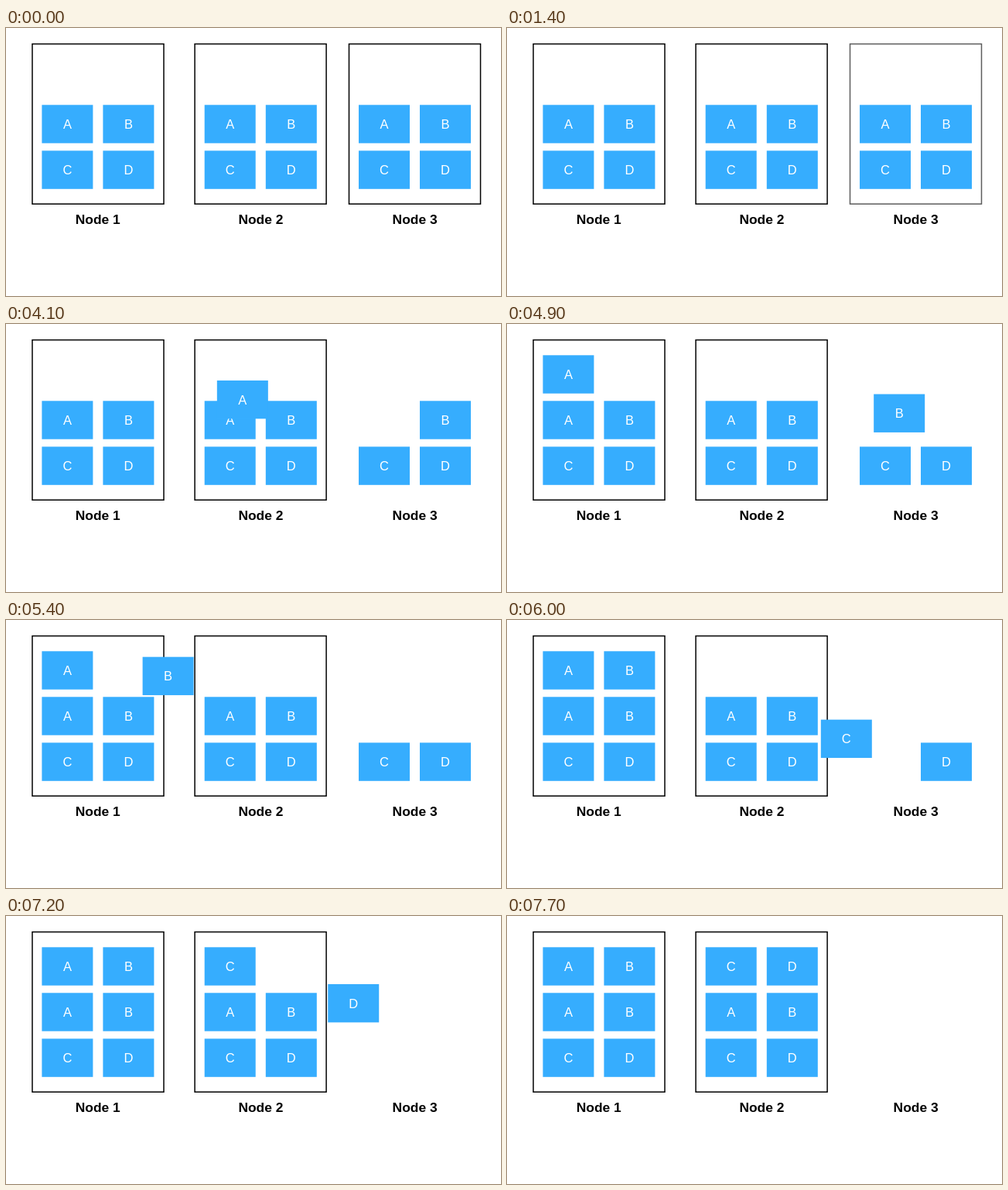
These frames come from a looping animation (640 by 346 pixels, 8 s). An HTML page:

```html
<!DOCTYPE html>
<html lang="en">
<head>
<meta charset="utf-8">
<title>Moving shards off a node</title>
<style>
  html, body { margin: 0; width: 100%; height: 100%; overflow: hidden; background: #fff; }
  svg { display: block; width: 100vw; height: 100vh; }
  text { font-family: "Liberation Sans", Arial, sans-serif; text-anchor: middle; }
  .frame { fill: none; stroke: #000; stroke-width: 1.5; }
  .name { font-size: 17.4px; font-weight: bold; fill: #000; }
  .tile rect { fill: #36adfe; }
  .tile text { font-size: 16.5px; fill: #fff; }
</style>
</head>
<body>
<svg id="stage" viewBox="0 0 640 346"></svg>
<script>
const LOOP = 8000;
const MOVE_TIME = 965;
const FADE = { start: 950, end: 2200 };
const TILE = { w: 66, h: 49.4 };
const ROWS = [40.3, 99.3, 158.4];
const NODES = [
  { x: 34, name: 118.7, cols: [46.4, 125.4] },
  { x: 244.1, name: 329.4, cols: [256.7, 335.8] },
  { x: 443.5, name: 528.6, cols: [456, 535] }
];

const stage = document.getElementById('stage');

function add(parent, tag, attrs, text) {
  const el = document.createElementNS('http://www.w3.org/2000/svg', tag);
  for (const key in attrs) el.setAttribute(key, attrs[key]);
  if (text) el.textContent = text;
  return parent.appendChild(el);
}

const slot = (node, col, row) => ({ x: NODES[node].cols[col], y: ROWS[row] });

function place(tile, { x, y }) {
  tile.setAttribute('transform', `translate(${x.toFixed(2)} ${y.toFixed(2)})`);
}

function addTile(letter, position) {
  const tile = add(stage, 'g', { class: 'tile' });
  add(tile, 'rect', { width: TILE.w, height: TILE.h });
  add(tile, 'text', { x: TILE.w / 2, y: 30.7 }, letter);
  place(tile, position);
  return tile;
}

const frames = NODES.map((node, i) => {
  add(stage, 'text', { class: 'name', x: node.name, y: 253.2 }, `Node ${i + 1}`);
  return add(stage, 'rect', { class: 'frame', x: node.x, y: 20.6, width: 170, height: 206.6 });
});

for (const node of [0, 1]) {
  [...'ABCD'].forEach((letter, i) => addTile(letter, slot(node, i % 2, 1 + (i >> 1))));
}

// Tiles of the lost node, each sent to a free slot on another node.
const moves = [
  { letter: 'A', start: 3650, from: slot(2, 0, 1), to: slot(0, 0, 0) },
  { letter: 'B', start: 4657, from: slot(2, 1, 1), to: slot(0, 1, 0) },
  { letter: 'C', start: 5677, from: slot(2, 0, 2), to: slot(1, 0, 0) },
  { letter: 'D', start: 6658, from: slot(2, 1, 2), to: slot(1, 1, 0) }
];
for (const move of moves) move.tile = addTile(move.letter, move.from);

const clamp = v => Math.min(1, Math.max(0, v));
const ease = u => (1 - Math.cos(Math.PI * u)) / 2;
const mix = (a, b, p) => a + (b - a) * p;

function draw(t) {
  frames[2].setAttribute('opacity', 1 - clamp((t - FADE.start) / (FADE.end - FADE.start)));
  for (const { tile, start, from, to } of moves) {
    const p = ease(clamp((t - start) / MOVE_TIME));
    place(tile, { x: mix(from.x, to.x, p), y: mix(from.y, to.y, p) });
  }
}

let origin;
function tick(now) {
  origin ??= now;
  draw((now - origin) % LOOP);
  requestAnimationFrame(tick);
}
draw(0);
requestAnimationFrame(tick);
</script>
</body>
</html>
```
